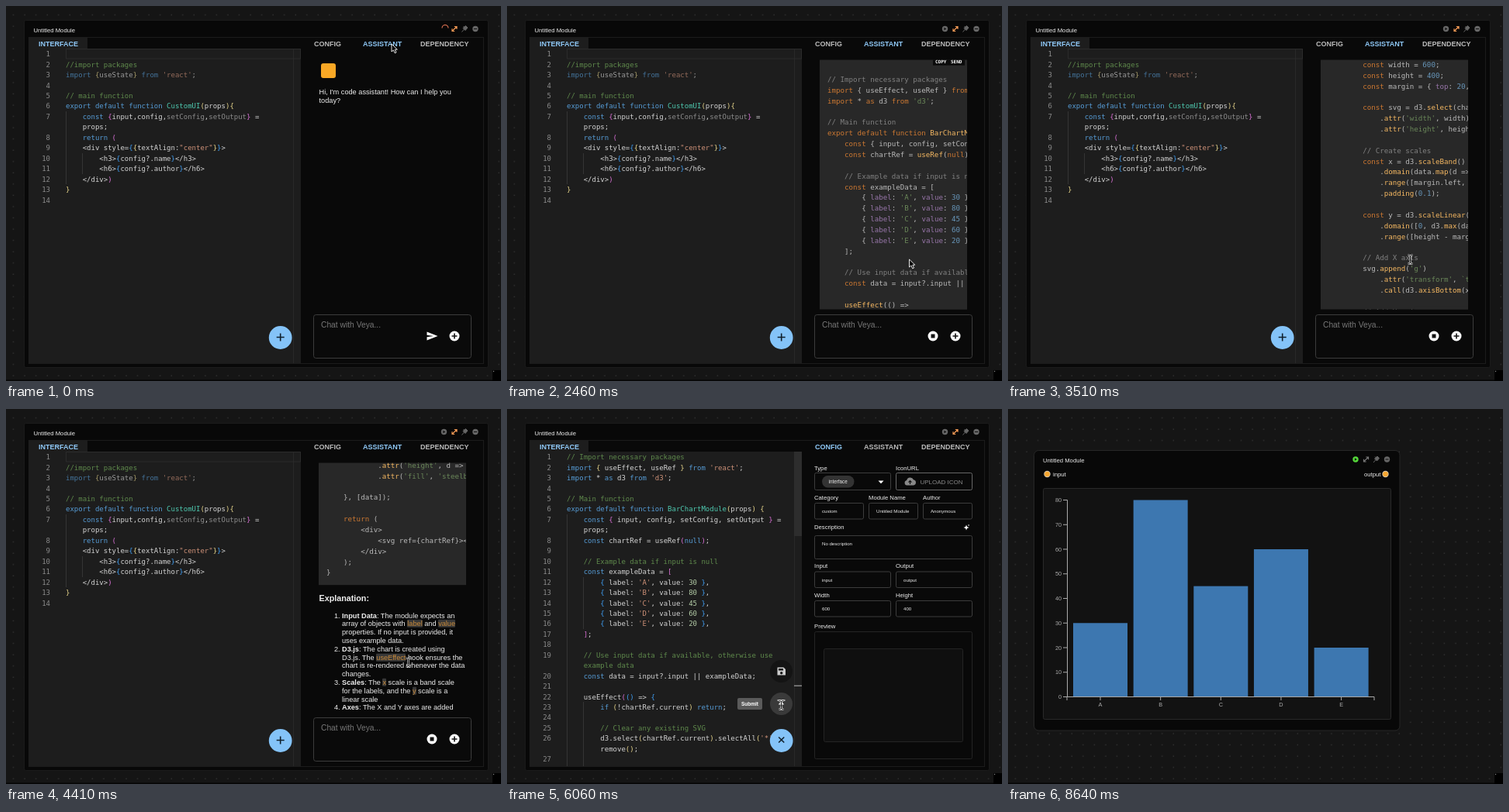
An HTML page for the animation above (8670 ms loop, 638 by 484 pixels).

```html
<!DOCTYPE html>
<html lang="en">
<head>
<meta charset="utf-8">
<title>Code assistant</title>
<style>
html, body { margin: 0; width: 100%; height: 100%; overflow: hidden; background: #141414; }
svg { display: block; width: 638px; height: 484px; }
text, .list { font-family: "Liberation Sans", Arial, sans-serif; }
.mono { font-family: "DejaVu Sans Mono", monospace; }
.list { padding: 17.6px 0 0 30px; font-size: 9.2px; line-height: 10.8px; color: #eee; white-space: nowrap; }
.list div { height: 10.8px; }
.list i { font-style: normal; float: left; width: 10px; margin-left: -10px; }
.list code { font: inherit; background: #383838; color: #c98a3a; border-radius: 1px; }
</style>
</head>
<body>
<svg id="stage" viewBox="0 0 638 484"></svg>
<script>
const LOOP = 8670, PITCH = 13.86, ROW = 13.45, STEP = 10.8;
const $ = id => document.getElementById(id);
const text = (x, y, s, size = 7.7, fill = '#eee', more = '') =>
  `<text x="${x}" y="${y}" font-size="${size}" fill="${fill}" ${more}>${s}</text>`;
const box = (x, y, w, h, fill = 'none', stroke = 'none', r = 0) =>
  `<rect x="${x}" y="${y}" width="${w}" height="${h}" rx="${r}" fill="${fill}" stroke="${stroke}"/>`;
const dot = (x, y, r, fill) => `<circle cx="${x}" cy="${y}" r="${r}" fill="${fill}"/>`;
const path = (d, stroke, width = 1, fill = 'none') =>
  `<path d="${d}" stroke="${stroke}" stroke-width="${width}" fill="${fill}"/>`;
const group = (id, body, more = '') => `<g id="${id}" ${more}>${body}</g>`;

const starter = `
//import packages
import {useState} from 'react';

// main function
export default function CustomUI(props){
    const {input,config,setConfig,setOutput} = props;
    return (
    <div style={{textAlign:"center"}}>
        <h3>{config?.name}</h3>
        <h6>{config?.author}</h6>
    </div>)
}
`.split('\n');

const answer = `// Import necessary packages
import { useEffect, useRef } from 'react';
import * as d3 from 'd3';

// Main function
export default function BarChartModule(props) {
    const { input, config, setConfig, setOutput } = props;
    const chartRef = useRef(null);

    // Example data if input is null
    const exampleData = [
        { label: 'A', value: 30 },
        { label: 'B', value: 80 },
        { label: 'C', value: 45 },
        { label: 'D', value: 60 },
        { label: 'E', value: 20 },
    ];

    // Use input data if available, otherwise use example data
    const data = input?.input || exampleData;

    useEffect(() => {
        if (!chartRef.current) return;

        // Clear any existing SVG
        d3.select(chartRef.current).selectAll('*').remove();

        // Set dimensions
        const width = 600;
        const height = 400;
        const margin = { top: 20, right: 30, bottom: 40, left: 40 };

        const svg = d3.select(chartRef.current)
            .attr('width', width)
            .attr('height', height);

        // Create scales
        const x = d3.scaleBand()
            .domain(data.map(d => d.label))
            .range([margin.left, width - margin.right])
            .padding(0.1);

        const y = d3.scaleLinear()
            .domain([0, d3.max(data, d => d.value)])
            .range([height - margin.bottom, margin.top]);

        // Add X axis
        svg.append('g')
            .attr('transform', \`translate(0,\${height - margin.bottom})\`)
            .call(d3.axisBottom(x));

        // Add Y axis
        svg.append('g')
            .attr('transform', \`translate(\${margin.left},0)\`)
            .call(d3.axisLeft(y));

        // Add bars
        svg.selectAll('.bar')
            .data(data)
            .enter()
            .append('rect')
            .attr('class', 'bar')
            .attr('x', d => x(d.label))
            .attr('y', d => y(d.value))
            .attr('width', x.bandwidth())
            .attr('height', d => y(0) - y(d.value))
            .attr('fill', 'steelblue');

    }, [data]);

    return (
        <div>
            <svg ref={chartRef}></svg>
        </div>
    );
}`.split('\n');

// Palette order: comment, string, keyword, number, call, bracket, property, unused
const TOKENS = /(\/\/.*)|('[^']*'|"[^"]*"|`[^`]*`)|\b(import|from|export|default|function|const|return|if|as|null)\b|\b(\d+\.?\d*)\b|([A-Za-z]\w*)(?=\()|([()[\]{}])|(\w+)(?=:)|\b(setConfig|setOutput)\b/g;
const editorColors = ['#5f8a4c', '#ce9178', '#569cd6', '#b5cea8', '#d4d4d4', '', '#d4d4d4', '#d4d4d4'];
const starterColors = [...editorColors.slice(0, 7), '#8c8c8c'];
const chatColors = ['#808080', '#6a8759', '#cc7832', '#6897bb', '#f5b862', '#bababa', '#9876aa', '#bababa'];
const pairs = ['#e6d48a', '#da70d6', '#3f9cf0'];

function painter(colors) {
  let depth = 0;
  return line => line.replace(/&/g, '&amp;').replace(/</g, '&lt;').replace(/>/g, '&gt;')
    .replace(TOKENS, (word, ...parts) => {
      const kind = parts.slice(0, 8).findIndex(p => p !== undefined);
      let color = colors[kind];
      if (!color) color = pairs[('([{'.includes(word) ? depth++ : --depth) % 3] || pairs[0];
      if (kind === 4 && colors !== chatColors && /^[A-Z]/.test(word)) color = '#4ec9b0';
      return `<tspan fill="${color}">${word}</tspan>`;
    });
}

function editor(lines, colors) {
  const paint = painter(colors);
  let row = 0, out = '';
  lines.forEach((line, n) => {
    out += text(57, 65.2 + row * ROW, n + 1, 9, '#8a8a8a', 'class="mono" text-anchor="end"');
    const indent = line.search(/\S|$/), comment = line[indent] === '/';
    const parts = line.length > 52 ? line.match(/^(.{0,51}[ .])(.+)$/).slice(1) : [line];
    for (const part of parts) {
      out += text(77 + indent * 5.418, 65.2 + row++ * ROW, paint(part.trim()), 9,
        comment ? colors[0] : '#d4d4d4', `class="mono" opacity="${line.includes('useState') ? .67 : 1}"`);
    }
  });
  return out;
}

const paintChat = painter(chatColors);
const chatCode = answer.map((line, i) => {
  const indent = line.search(/\S|$/);
  return text(413 + indent * 5.52, i * PITCH + 3.3, paintChat(line.trim()), 9.17, '#bababa', 'class="mono"');
}).join('');

const notes = [
  '<b>Input Data</b>: The module expects an', 'array of objects with <code>label</code> and <code>value</code>',
  'properties. If no input is provided, it', 'uses example data.',
  '<b>D3.js</b>: The chart is created using', 'D3.js. The <code>useEffect</code> hook ensures the',
  'chart is re-rendered whenever the data', 'changes.',
  '<b>Scales</b>: The <code>x</code> scale is a band scale', 'for the labels, and the <code>y</code> scale is a',
  'linear scale<span id="tail"> for the values.</span>',
  '<b>Axes</b>: The X and Y axes are added', 'to the chart at the bottom and left.',
  '<b>Bars</b>: A <code>rect</code> is appended for', 'each item and filled with steelblue.'
];
let count = 0;
const noteRows = notes.map(s => `<div>${s.startsWith('<b>') ? `<i>${++count}.</i>` : ''}${s}</div>`).join('');

const badge = y => box(406, y, 19, 19, '#f9a825', 'none', 3);
const chat =
  badge(-206) + text(403.5, -166, "Hi, I'm code assistant! How can I help you", 9.2) + text(403.5, -155.2, 'today?', 9.2) +
  dot(415, -124, 8, '#90caf9') + text(403.5, -100, 'Create a bar chart module with d3', 9.2) +
  badge(-88) + text(403.5, -53, 'Here is a bar chart module built with', 9.2) + text(403.5, -42, 'D3.js:', 9.2) +
  box(403, -30, 190, 75 * PITCH + 46, '#282828') + box(549, -29, 41, 11, '#0a0a0a') +
  text(552, -21, 'COPY', 6, '#fff', 'class="mono" font-weight="700"') +
  text(572, -21, 'SEND', 6, '#fff', 'class="mono" font-weight="700"') + chatCode +
  `<rect id="cover" width="300" height="13" fill="#282828"/>` +
  text(403.5, 1076, 'Explanation:', 10.75, '#eee', 'font-weight="700"') +
  `<foreignObject x="403" y="1072" width="200" height="240"><div xmlns="http://www.w3.org/1999/xhtml" class="list">${noteRows}</div></foreignObject>`;

function icons(x, y, expand) {
  return path(`M${x + 10.5} ${y + 3}L${x + 16.5} ${y - 3}M${x + 13.3} ${y - 3}h3.2v3.2M${x + 10.5} ${y - .2}v3.2h3.2`, expand, 1.2) +
    path(`M${x + 25} ${y - 3.5}l4 4M${x + 28} ${y - 4}l2.5 2.5l-3 3.5l-3 -3zM${x + 26} ${y + .5}l-3 3.5`, '#666', 1, '#666') +
    dot(x + 40.5, y, 3.7, '#666') + path(`M${x + 38.5} ${y}h4`, '#111');
}
const playDot = (id, x, y, fill) => group(id, dot(x, y, 3.7, fill) + path(`M${x - 1.1} ${y - 1.7}l3 1.7l-3 1.7z`, 'none', 0, '#111'));

const field = (x, y, w, label, value) =>
  text(x, y - 4.5, label) + box(x + .5, y + .5, w - 1, 20.5, 'none', '#3c3c3c', 2) + text(x + 10, y + 13, value, 6.1);
const config =
  text(396, 79, 'Type') + text(501, 79, 'IconURL') +
  box(396.5, 82.5, 98, 22, 'none', '#3c3c3c', 2) + box(406, 86, 41.5, 15.5, '#333', 'none', 7.7) +
  text(414.5, 96, 'interface', 6.3) + path('M478.5 92.5h7l-3.5 3.7z', 'none', 0, '#fff') +
  box(501.5, 82.5, 98, 22, 'none', '#666', 2) +
  path('M515.5 98.5a3.3 3.3 0 0 1 -.3 -6.5a4.6 4.6 0 0 1 8.7 -.8a3.7 3.7 0 0 1 0 7.3z', 'none', 0, '#888') +
  path('M519.5 97v-4M517.5 94.7l2 -2l2 2', '#111', 1.2) + text(532.5, 97, 'UPLOAD ICON', 8, '#888') +
  field(396, 121, 64, 'Category', 'custom') + field(466, 121, 64, 'Module Name', 'Untitled Module') +
  field(536, 121, 64, 'Author', 'Anonymous') + text(396, 154.5, 'Description') +
  path('M592 149.5l1 2.5l2.5 1l-2.5 1l-1 2.5l-1 -2.5l-2.5 -1l2.5 -1z', 'none', 0, '#fff') + dot(595, 150, .8, '#fff') +
  box(396.5, 163.5, 203, 30, 'none', '#3c3c3c', 2) + text(406, 176, 'No description', 6.1) +
  field(396, 209.5, 99, 'Input', 'input') + field(501, 209.5, 99, 'Output', 'output') +
  field(396, 247, 99, 'Width', '600') + field(501, 247, 99, 'Height', '400') +
  text(396, 283, 'Preview') + box(396.5, 287.5, 203, 164, 'none', '#242424', 2) + box(408.5, 309.5, 179, 120, '#0f0f0f', '#242424', 2);

const tab = (id, x, s) => text(x, 52, s, 9, '#bbb', `id="${id}" font-weight="700"`);
const chatBox =
  `<rect id="field" x="396.5" y="398.5" width="203" height="56" rx="3" fill="#0a0a0a" stroke="#3c3c3c"/>` +
  text(406, 415, '', 10.28, '#777', 'id="prompt"') +
  group('send', path('M542.5 420.5L556.5 426L542.5 431.5V427.3L551 426L542.5 424.7z', 'none', 0, '#fff')) +
  group('stop', dot(549, 426, 6.5, '#fff') + box(546.5, 423.5, 5, 5, '#111')) +
  dot(578, 426, 6.5, '#fff') + path('M574.5 426h7M578 422.5v7', '#111', 1.6);

const dial =
  dot(353.5, 338.5, 14.5, '#141414') +
  path('M348.5 333.5h8l2.5 2.5v7.5h-10.5z', 'none', 0, '#ccc') + box(350, 335, 6, 2.5, '#141414') + dot(353.7, 340.7, 1.7, '#141414') +
  dot(353.5, 380.5, 14.5, '#3a3a3a') + path('M348.5 376h10M353.5 386v-7.5M350.5 381.5l3 -3l3 3', '#ddd', 1.6) +
  group('tip', box(297, 373, 32, 15, '#5a5a5a', 'none', 2) + text(302, 382.7, 'Submit', 6.5, '#fff', 'font-weight="700"'));

const large =
  box(23.5, 18.5, 598, 448, '#080808', '#1b1b1b', 2) + text(35.5, 33.5, 'Untitled Module') + icons(564.5, 29.5, '#f59a55') +
  playDot('idle', 564.5, 29.5, '#666') + playDot('ready', 564.5, 29.5, '#55d83a') +
  group('spinner', path('M-4 0A4 4 0 0 1 4 0', '#ee7a58', 1.1)) +
  box(29.5, 40.5, 586, 421, '#090909', '#1b1b1b') + box(29, 40, 76, 16, '#1d1d1d') + box(29, 55, 351, 406.5, '#1d1d1d') +
  text(42, 52, 'INTERFACE', 9, '#90caf9', 'font-weight="700"') +
  tab('tabConfig', 397, 'CONFIG') + tab('tabChat', 460, 'ASSISTANT') + tab('tabDeps', 534, 'DEPENDENCY') +
  path('M370.5 55V461', '#292929') +
  group('before', box(77.5, 55.5, 302, 12.5, 'none', '#2b2b2b') + path('M77.5 136V230M98.5 190V217', '#343434') + editor(starter, starterColors)) +
  group('after', box(370, 55, 10, 109, '#2d2d2d') + box(370, 356.5, 10, 1.5, '#888') +
    path('M77.5 136V461M98.5 217V284M98.5 378V461', '#343434') + editor(answer.slice(0, 27), editorColors)) +
  group('dial', dial) + dot(353.7, 428, 14.9, '#84c3f8') +
  group('cross', path('M-5 0h10M0 -5v10', '#10202c', 1.6)) +
  group('chatPane', `<g clip-path="url(#view)"><g id="chat"><g clip-path="url(#shown)">${chat}</g></g></g>` + chatBox) +
  group('configPane', config);

const ticks = [...Array(9).keys()].map(k => {
  const y = 371.5 - k * 31.75;
  return path(`M71 ${y}h5`, '#aaa') + text(69, y + 2.5, k * 10, 7.3, '#aaa', 'text-anchor="end"');
}).join('');
const bars = [30, 80, 45, 60, 20].map((v, i) => {
  const x = 84 + i * 77.65;
  return box(x, 371.5 - v * 3.175, 70, v * 3.175, '#3d77b0') + path(`M${x + 35} 371.5v4.5`, '#aaa') +
    text(x + 35, 383.5, 'ABCDE'[i], 7.3, '#aaa', 'text-anchor="middle"');
}).join('');
const port = x => dot(x, 84, 4.2, '#d8cbb5') + dot(x, 84, 3.3, '#f5a630');
const small =
  box(33.5, 53.5, 471.5, 361.5, '#080808', '#272727', 6) + text(45, 69, 'Untitled Module') +
  playDot('done', 448, 65, '#55d83a') + icons(448, 65, '#777') +
  port(50.5) + text(58, 86.7, 'input') + text(459, 86.7, 'output') + port(486.5) +
  box(45.5, 102.5, 448, 298, '#121212', '#292929', 2) + ticks + bars +
  path('M71 117.5H76.5V371.5M76 376V371.5H472V376', '#aaa');

const beamPath = 'M-3 -5.5Q0 -5.5 0 -4Q0 -5.5 3 -5.5M0 -4V4M-3 5.5Q0 5.5 0 4Q0 5.5 3 5.5M-1.5 1h3';
$('stage').innerHTML =
  `<defs><pattern id="grid" x="2.5" y="4.5" width="14.55" height="14.55" patternUnits="userSpaceOnUse">${dot(7, 7, .65, '#414141')}</pattern>
  <clipPath id="view"><rect x="403" y="69.5" width="190" height="322"/></clipPath>
  <clipPath id="shown"><rect id="reveal" x="400" y="-300" width="200" height="10"/></clipPath></defs>` +
  box(0, 0, 638, 484, '#151515') + box(0, 0, 638, 484, 'url(#grid)') + box(0, 482.5, 638, 2, '#050505') +
  box(627, 470, 11, 14, '#000') + dot(628.5, 471.5, .7, '#888') +
  group('large', large) + group('small', small) +
  group('cursor', group('arrow', path('M0 0V10L2.4 7.9L4.2 11.8L6 11L4.3 7.2H7.3z', '#fff', .9, '#000')) +
    group('beam', path(beamPath, '#fff', 2.2) + path(beamPath, '#000', .9)));

// Interpolates rows of [time, value...]
function at(keys, t, ease = u => u) {
  const i = keys.findIndex(k => k[0] > t);
  if (i < 1) return keys[i ? keys.length - 1 : 0].slice(1);
  const [a, b] = [keys[i - 1], keys[i]], u = ease((t - a[0]) / (b[0] - a[0]));
  return a.slice(1).map((v, j) => v + (b[j + 1] - v) * u);
}
const smooth = u => u * u * (3 - 2 * u);
const scroll = [[1983, 280], [2460, 95], [3510, -312], [4410, -828], [4540, -868], [4700, -868], [5080, 112]];
const typed = [[1694, 0], [2460, 21.88], [3510, 51.9], [4060, 76]];
const noted = [[4060, 0], [4410, 10.99], [4560, 16]];
const pointer = [[0, 497, 49], [60, 497, 49], [350, 440, 410], [1000, 440, 410], [1200, 549, 427], [1350, 549, 427],
  [1800, 518.5, 327], [5080, 518.5, 327], [5230, 579, 89], [5300, 579, 89], [5460, 415, 49], [5520, 415, 49],
  [5740, 354, 428], [5800, 354, 428], [5960, 353.5, 382], [6350, 353.5, 382], [6900, 565.5, 31], [7550, 565.5, 31],
  [7900, 578, 30], [8120, 578, 30], [8400, 660, 20]];
const request = 'Create a bar chart module with d3';

const show = (id, on) => $(id).style.display = on ? '' : 'none';
const move = (id, s) => $(id).setAttribute('transform', s);
const set = (id, key, v) => $(id).setAttribute(key, v);

// Lower edge of the chat content written so far
function revealed(t) {
  if (t < 1270) return -145;
  if (t < 1450) return -92;
  if (t < 1694) return -32;
  if (t < 4060) return (Math.floor(at(typed, t)[0]) + .5) * PITCH;
  return 1089.6 + STEP * (Math.floor(at(noted, t)[0]) + 1);
}

function draw(t) {
  const configOn = t >= 5480, sent = t >= 5280, busy = t >= 1270 && t < 4560;
  const spinning = t < 400 || t >= 7450 && t < 7900;
  show('large', t < 8110);
  show('small', t >= 8110);
  show('before', !sent);
  show('after', sent);
  show('chatPane', !configOn);
  show('configPane', configOn);
  set('tabConfig', 'fill', configOn ? '#90caf9' : '#bbb');
  set('tabChat', 'fill', configOn ? '#bbb' : '#90caf9');
  show('spinner', spinning);
  show('ready', t >= 7900);
  show('idle', !spinning && t < 7900);
  move('spinner', `translate(566 28.5) rotate(${t * .4})`);

  move('chat', `translate(0 ${at(scroll, t, t > 4700 ? smooth : undefined)[0]})`);
  set('reveal', 'height', 300 + revealed(t));
  const p = at(typed, t)[0], line = Math.floor(p), length = (answer[line] || '').length;
  show('cover', t >= 1694 && line < answer.length);
  set('cover', 'x', 413 + Math.round((p - line) * length) * 5.52);
  set('cover', 'y', line * PITCH - 6.5);
  show('tail', t >= 4440);

  const letters = Math.floor((t - 450) / 19), writing = letters > 0 && t < 1270;
  $('prompt').textContent = writing ? request.slice(0, letters) : 'Chat with Veya...';
  set('prompt', 'fill', writing ? '#eee' : '#777');
  set('field', 'stroke', t > 370 && t < 1270 ? '#90caf9' : '#3c3c3c');
  show('send', !busy);
  show('stop', busy);

  const open = at([[5770, 0], [5920, 1], [6250, 1], [6380, 0]], t, smooth)[0];
  show('dial', open > 0);
  set('dial', 'opacity', open);
  show('tip', t >= 5970);
  move('cross', `translate(353.7 ${427.5 - open * .5}) rotate(${open * 45})`);

  const [x, y] = at(pointer, t, smooth);
  const beam = t > 2600 && t < 5080 || t > 380 && t < 1000 || t > 5960 && t < 6350;
  move('cursor', `translate(${x} ${y})`);
  show('beam', beam);
  show('arrow', !beam);
}

const start = performance.now();
function tick() {
  draw((performance.now() - start) % LOOP);
  requestAnimationFrame(tick);
}
tick();
</script>
</body>
</html>
```
